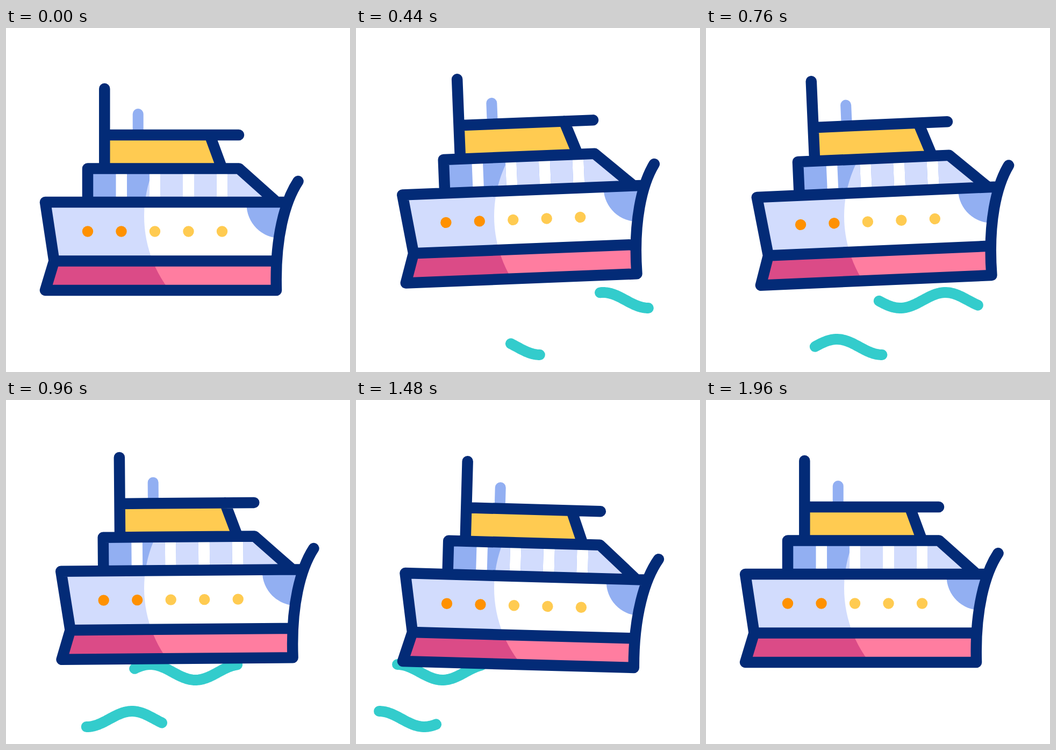
An HTML page that plays this animation: 640 px wide and 640 px high, repeating every 2000 ms.

```html
<!DOCTYPE html>
<html lang="en">
<head>
<meta charset="utf-8">
<title>Yacht on waves</title>
<style>
  html, body { margin: 0; width: 100%; height: 100%; overflow: hidden; background: #fff; }
  svg { display: block; width: 100vw; height: 100vh; }
  .line { fill: none; stroke: #032b77; stroke-width: 20.5; stroke-linecap: round; stroke-linejoin: round; }
  .wave { fill: none; stroke: #33cccc; stroke-width: 20; stroke-linecap: round; stroke-linejoin: round; }
</style>
</head>
<body>
<svg viewBox="0 0 640 640">
  <defs>
    <clipPath id="lit"><circle cx="483" cy="350" r="226"/></clipPath>
    <path id="hull" d="M73 324H524.5Q507 370 503 433.5H89.5Z"/>
    <clipPath id="inHull"><use href="#hull"/></clipPath>
    <path id="keel" d="M89.5 433.5H503V488H73Z"/>
    <path id="panes" d="M152 262H204.5V324H152ZM225 262H267V324H225ZM287.500 262H329V324H287.500ZM350 262H391.500V324H350ZM412.500 262H433.500L503.500 324H412.500Z"/>
  </defs>

  <path class="wave"/>
  <path class="wave"/>

  <g class="boat">
    <path d="M245.700 199V160" fill="none" stroke="#92aff2" stroke-width="20" stroke-linecap="round"/>
    <path d="M183.300 199H379L402 261.500H183.300Z" fill="#ffcb51"/>
    <path d="M152 261.500H433.500L503.500 324H152Z" fill="#fff"/>
    <use href="#panes" fill="#92aff2"/>
    <use href="#hull" fill="#d2dcfd"/>
    <use href="#keel" fill="#db4b87"/>
  </g>

  <!-- The light stays fixed on the stage while the boat moves through it. -->
  <g clip-path="url(#lit)">
    <g class="boat">
      <use href="#panes" fill="#d2dcfd"/>
      <use href="#hull" fill="#fff"/>
      <use href="#keel" fill="#ff7da0"/>
    </g>
  </g>

  <g class="boat">
    <circle cx="510.500" cy="328" r="63" fill="#92aff2" clip-path="url(#inHull)"/>
    <g fill="#ff9100">
      <circle cx="152" cy="378.500" r="10.200"/>
      <circle cx="214.500" cy="378.500" r="10.200"/>
    </g>
    <g fill="#ffcb51">
      <circle cx="277" cy="378.500" r="10.200"/>
      <circle cx="339.500" cy="378.500" r="10.200"/>
      <circle cx="402" cy="378.500" r="10.200"/>
    </g>
    <path class="line" d="M183.300 113V261.500M183.300 199H433M379 199L402 261.500
      M152 324V261.500H433.500L503.500 324
      M524 324H73L89.500 433.500L73 488H503C500 390 519 322 543.500 285M89.500 433.500H503"/>
  </g>
</svg>
<script>
  const LOOP = 2000, DRIFT = 0.045, HALF = 84, SWELL = 14.5;
  const boats = document.querySelectorAll('.boat');
  const waves = document.querySelectorAll('.wave');

  // Keys are [time, value] pairs.
  const shiftX = [[0, 0], [280, 6.6], [440, 12.9], [560, 14.9], [760, 21.3], [1140, 33.3],
    [1480, 18.6], [1700, 3], [1820, 0.9], [2000, 0]];
  const shiftY = [[0, 0], [280, -13.8], [440, -23.2], [580, -25.6], [760, -19.9], [1160, 5],
    [1320, 7.5], [1480, 5], [1700, 0.6], [2000, 0]];
  const tilt = [[0, 0], [280, -1.15], [440, -2.27], [590, -2.75], [760, -2.5], [1160, 1.6],
    [1320, 2.05], [1480, 1.6], [1700, 0.25], [2000, 0]];

  // Each wave grows leftward over a number of half periods, then its tail follows.
  const swells = [
    { start: 563.7, y: 506.5, halves: 5, tail: 690 },
    { start: 361.7, y: 593.5, halves: 3, tail: 835 }
  ];

  const ramp = (t, a, b) => Math.min(1, Math.max(0, (t - a) / (b - a)));

  function slope(keys, i) {
    const a = keys[i - 1], k = keys[i], b = keys[i + 1];
    if (!a || !b || (k[1] - a[1]) * (b[1] - k[1]) <= 0) return 0;
    return (b[1] - a[1]) / (b[0] - a[0]);
  }

  function sample(keys, t) {
    let i = 0;
    while (i < keys.length - 2 && t >= keys[i + 1][0]) i++;
    const [t0, v0] = keys[i], [t1, v1] = keys[i + 1];
    const d = t1 - t0, p = (t - t0) / d, q = 1 - p;
    return v0 * q * q * (1 + 2 * p) + v1 * p * p * (1 + 2 * q)
      + d * p * q * (slope(keys, i) * q - slope(keys, i + 1) * p);
  }

  function wavePath({ start, y, halves, tail }, t) {
    const length = halves * HALF;
    const from = length * ramp(t, tail, 1950), to = length * ramp(t, 197, 1338);
    if (to <= from) return '';
    const steps = Math.ceil((to - from) / 3), points = [];
    for (let i = 0; i <= steps; i++) {
      const s = from + (to - from) * i / steps;
      const px = start - s - DRIFT * t, py = y + SWELL * Math.cos(Math.PI * s / HALF);
      points.push(px.toFixed(2) + ' ' + py.toFixed(2));
    }
    return 'M' + points.join('L');
  }

  function draw(now) {
    const t = now % LOOP;
    const move = `translate(${sample(shiftX, t)} ${sample(shiftY, t)}) rotate(${sample(tilt, t)} 320 320)`;
    boats.forEach(b => b.setAttribute('transform', move));
    waves.forEach((w, i) => w.setAttribute('d', wavePath(swells[i], t)));
  }

  const begin = performance.now();
  function tick() {
    draw(performance.now() - begin);
    requestAnimationFrame(tick);
  }
  tick();
</script>
</body>
</html>
```
